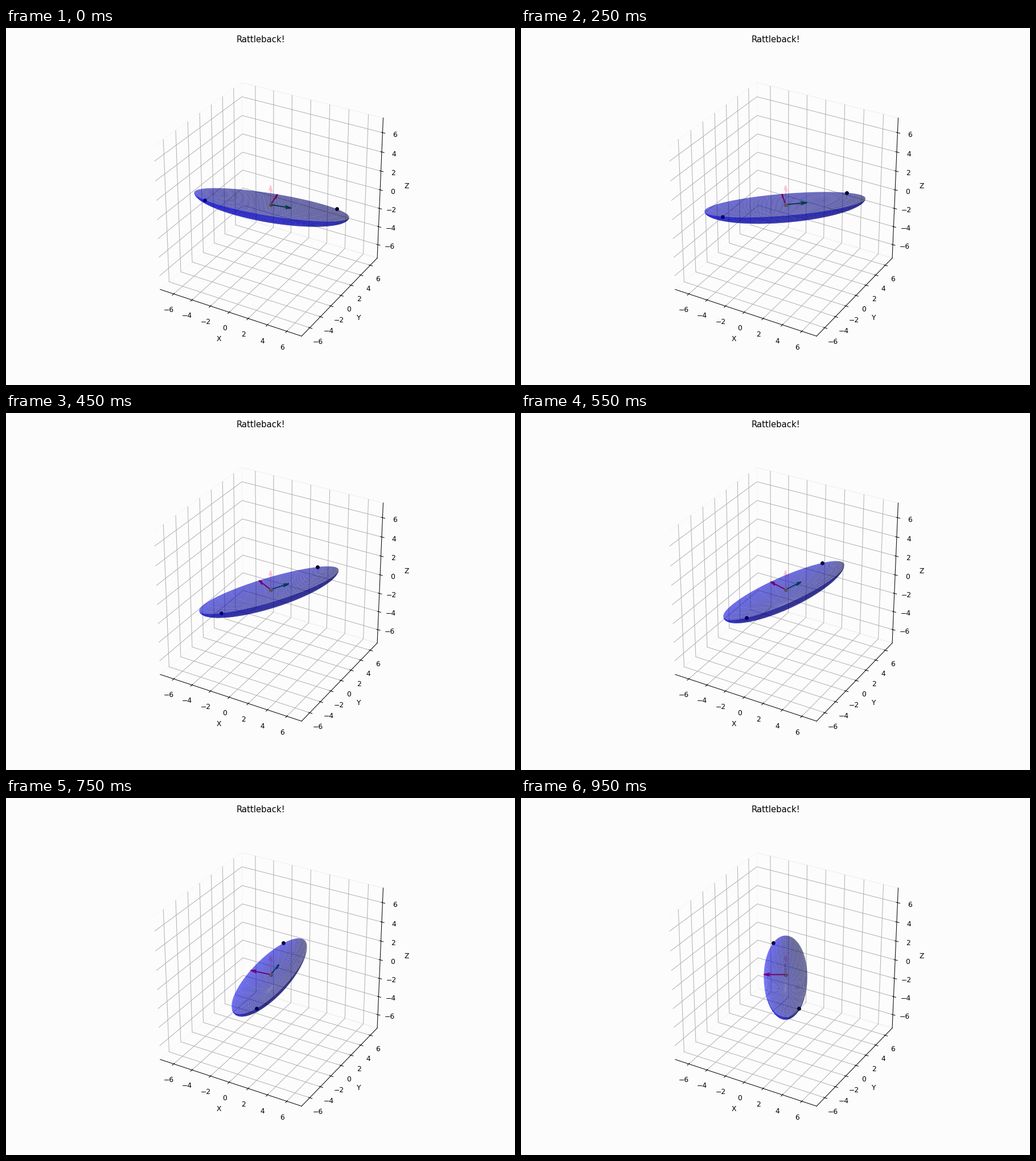
Recreate the animation shown at these times as a matplotlib script. Size 894 by 626 pixels, loop 1 s.

```python
import numpy as np
import matplotlib.pyplot as plt
from matplotlib.animation import FuncAnimation

WIDTH, HEIGHT, DPI = 894, 626, 89.4
FRAMES, INTERVAL = 20, 50
A, B, C = 7.5, 2.0, 1.5           # semi-axes of the half ellipsoid
START, SPIN = 0.1935, 0.1         # radians, radians per frame
MASS = np.array([6.0, 1.2, 0.0])
ARROW = 2.0

eps = 1e-6                        # keeps the pixel size from rounding down
fig = plt.figure(figsize=((WIDTH + eps) / DPI, (HEIGHT + eps) / DPI),
                 dpi=DPI, facecolor="#fcfcfc")
fig.suptitle("Rattleback!")
ax = fig.add_subplot(projection="3d", facecolor="none")
ax.set_box_aspect((1, 1, 1))
ax.set(xlim=(-A, A), ylim=(-A, A), zlim=(-A, A),
       xlabel="X", ylabel="Y", zlabel="Z")
for axis in (ax.xaxis, ax.yaxis, ax.zaxis):
    axis.pane.fill = False

u = np.linspace(0, 2 * np.pi, 51)
v = np.linspace(np.pi / 2, np.pi, 51)
HULL = np.array([A * np.outer(np.cos(u), np.sin(v)),
                 B * np.outer(np.sin(u), np.sin(v)),
                 C * np.outer(np.ones_like(u), np.cos(v))])

artists = []


def rotation(angle):
    c, s = np.cos(angle), np.sin(angle)
    return np.array([[c, -s, 0], [s, c, 0], [0, 0, 1]])


def draw(frame):
    while artists:
        artists.pop().remove()
    turn = rotation(START + SPIN * frame)
    hull = np.tensordot(turn, HULL, axes=1)
    artists.append(ax.plot_surface(*hull, color="b", alpha=0.6, linewidth=0,
                                   rcount=50, ccount=50))
    for direction, color in zip(turn.T, ("g", "r", "pink")):
        artists.append(ax.quiver(0, 0, 0, *(ARROW * direction), color=color))
    mass = turn @ MASS
    for point, color in ((mass, "k"), (-mass, "k"), (0 * mass, "y")):
        artists.append(ax.scatter(*point, color=color))
    return artists


anim = FuncAnimation(fig, draw, frames=FRAMES, interval=INTERVAL,
                     init_func=lambda: artists, repeat=True, repeat_delay=0,
                     blit=False)
plt.show()
```
